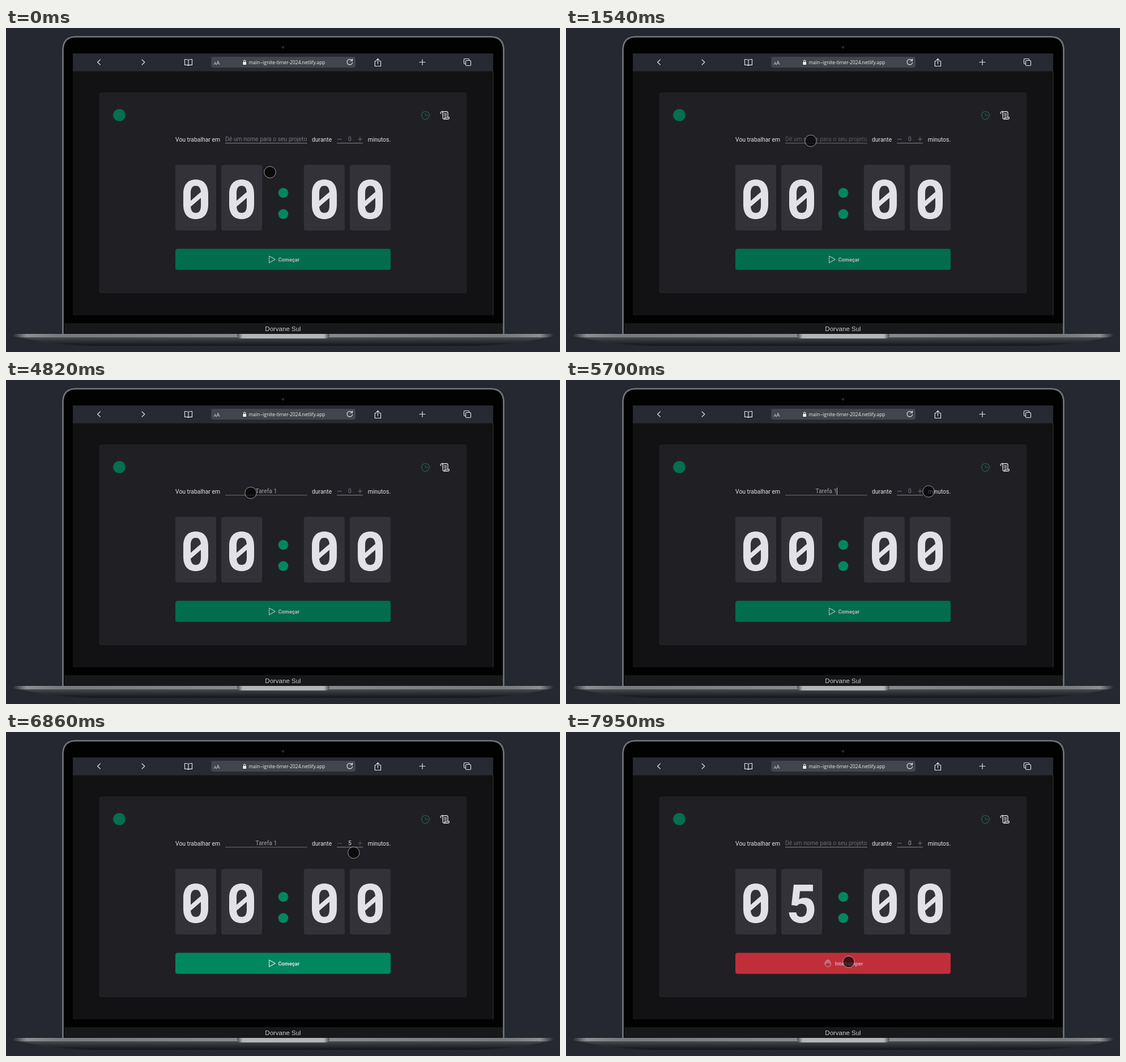
Write an HTML page that moves like this. It is 978 px wide and 573 px high and loops after 8 s.

```html
<!DOCTYPE html>
<html lang="pt">
<head>
<meta charset="utf-8">
<title>Timer</title>
<style>
html, body { margin: 0; width: 100%; height: 100%; overflow: hidden; background: #252830; }
svg { display: block; width: 100vw; height: 100vh; }
text { font-family: Roboto, sans-serif; font-size: 10.4px; fill: #e1e1e6; white-space: pre; }
.mid { text-anchor: middle; }
.bold { font-size: 9.3px; font-weight: 700; }
.line { fill: none; stroke: #e4e5e8; stroke-width: 1.15; stroke-linecap: round; stroke-linejoin: round; }
</style>
</head>
<body>
<svg viewBox="0 0 978 573" xmlns="http://www.w3.org/2000/svg">
  <defs>
    <linearGradient id="deck">
      <stop offset="0" stop-color="#25282f"/><stop offset=".025" stop-color="#8d8f92"/>
      <stop offset=".09" stop-color="#77797c"/><stop offset=".5" stop-color="#8a8c8f"/>
      <stop offset=".91" stop-color="#77797c"/><stop offset=".975" stop-color="#8d8f92"/>
      <stop offset="1" stop-color="#25282f"/>
    </linearGradient>
    <linearGradient id="hull" x2="0" y2="1">
      <stop offset="0" stop-color="#505257"/><stop offset=".4" stop-color="#35373c"/>
      <stop offset="1" stop-color="#15161a"/>
    </linearGradient>
    <linearGradient id="notch">
      <stop offset="0" stop-color="#4b4d50"/><stop offset=".06" stop-color="#b4b5b7"/>
      <stop offset=".94" stop-color="#b4b5b7"/><stop offset="1" stop-color="#4b4d50"/>
    </linearGradient>
    <path id="d0" fill-rule="evenodd" d="M-22-9C-22-26-14-35 0-35S22-26 22-9V9C22 26 14 35 0 35S-22 26-22 9Z
      M-9 2.5V-11C-9-20-6-24 0-24C5-24 8.3-21 9-13Z M9-2.5V11C9 20 6 24 0 24C-5 24-8.3 21-9 13Z"/>
    <path id="d5" d="M-18 3L-14-33H20V-21.5H-3L-4.5-7C-1.5-9 2-9.7 6-9.7C17-9.7 22.5-2 22.5 11
      C22.5 26 13 35-1 35C-13 35-22 27-22.5 16H-9.5C-9 21-6 24-1 24C6 24 9 19 9 11C9 4 5 .8-1 .8C-4 .8-6.5 2-8 4.5Z"/>
  </defs>
  <rect width="978" height="573" fill="#252830"/>

  <!-- laptop -->
  <path d="M100.5 543V39Q100.5 15.5 124 15.5H855Q878.5 15.5 878.5 39V543Z" fill="#020203" stroke="#74777b" stroke-width="2.6"/>
  <circle cx="489" cy="34" r="2.4" fill="#24262b"/>
  <rect x="103" y="522" width="774" height="20" fill="#17181a"/>
  <text class="mid" x="489" y="536.2" style="font:11.5px 'Liberation Sans',sans-serif;fill:#c9cacc">Dorvane Sul</text>
  <path d="M13 545C60 555 100 561 152 562H827C880 561 920 555 966 545Z" fill="url(#hull)"/>
  <path d="M12 541H967V544Q962 547 952 547H27Q17 547 12 544Z" fill="url(#deck)"/>
  <path d="M408 541H571V544Q570 549 563 549H416Q409 549 408 544Z" fill="url(#notch)"/>
  <path d="M329 556h4M646 556h4" stroke="#222429"/>

  <!-- browser -->
  <rect x="118" y="45" width="742" height="463" fill="#121214"/>
  <path d="M860 76V508" stroke="#36383d"/>
  <rect x="118" y="45" width="742" height="31.5" fill="#272a32"/>
  <rect x="362" y="51" width="255" height="19" rx="4" fill="#43454c"/>
  <text x="367" y="65" style="font:7px 'Open Sans',sans-serif">A<tspan font-size="9">A</tspan></text>
  <text x="428.5" y="64" style="font:8.35px 'Open Sans',sans-serif;fill:#f0f0f2">main--ignite-timer-2024.netlify.app</text>
  <rect x="418.3" y="60" width="5.8" height="5" rx=".8" fill="#eee"/>
  <path class="line" d="M419.5 60v-1.2a1.7 1.7 0 0 1 3.4 0V60"/>
  <g class="line">
    <path d="M166.3 56L161.6 60.5L166.3 65M240 56L244.7 60.5L240 65"/>
    <path d="M322 57Q321 55.5 318.5 55.5H315.5V65.3H319Q321.3 65.3 322 66.5Q322.7 65.3 325 65.3H328.5V55.5H325.5Q323 55.5 322 57V66.5"/>
    <path d="M611 57.5A4.8 4.8 0 1 0 611.7 61M611.5 54.5V58H608"/>
    <path d="M653.5 58.5H651.3V67.5H661.5V58.5H659.3M656.4 63.5V54.5M653.8 57L656.4 54.3L659 57"/>
    <path d="M735 55.5V65.5M730 60.5H740"/>
    <rect x="811.5" y="57.5" width="9" height="9" rx="1.5"/>
    <path d="M811 63.5H809.7Q808.5 63.5 808.5 62.3V55.7Q808.5 54.5 809.7 54.5H816.3Q817.5 54.5 817.5 55.7V57"/>
  </g>

  <!-- app -->
  <rect x="164.5" y="114" width="649" height="355" rx="4" fill="#202024"/>
  <circle cx="200" cy="154" r="10.8" fill="#04704f"/>
  <g class="line" style="stroke:#047150">
    <circle cx="740.5" cy="154.5" r="7"/><path d="M740.5 150.5V154.7H744.5"/>
  </g>
  <path class="line" style="stroke-width:1.3" d="M767.8 151.5A2 2 0 1 1 771.2 150V159A2 2 0 0 0 773 161H780.5A2 2 0 0 0 782 157.8H774.5A2 2 0 0 1 773 161M769 148H778Q780 148 780 150V157.5M773.8 152H777.5M773.8 154.8H777.5"/>

  <text x="299" y="200.6">Vou trabalhar em</text>
  <text id="hint" x="387" y="200.2">Dê um nome para o seu projeto</text>
  <text id="task" class="mid" x="459.5" y="200.2" style="fill:#a09fa4"></text>
  <rect id="caret" y="190.5" width="1" height="12.5" fill="#c4c4c9"/>
  <rect id="rule" x="387" y="203" width="144.7" height="1.2"/>
  <text x="540" y="200.6">durante</text>
  <path id="signs" d="M585 196.7H593M621 196.7H629M625 192.7V200.7" stroke-width="1"/>
  <text id="mins" class="mid" x="607" y="200.2">0</text>
  <rect x="584" y="203" width="46" height="1.2" fill="#77747f"/>
  <text x="638.7" y="200.6">minutos.</text>

  <g id="cards"></g>
  <circle cx="489.5" cy="291.5" r="8.8" fill="#00875f"/>
  <circle cx="489.5" cy="329" r="8.8" fill="#00875f"/>

  <rect id="button" x="299" y="390.5" width="380" height="37.3" rx="4"/>
  <g id="start">
    <path class="line" d="M464.6 403.3V415.3L475.2 409.3Z" style="stroke:inherit"/>
    <text class="bold" x="480.5" y="412.8" style="fill:inherit">Começar</text>
  </g>
  <g id="stop" style="fill:#c3a9aa;stroke:#c3a9aa">
    <path class="line" d="M459 410V405.2A1.1 1.1 0 0 1 461.2 405.2V408M461.2 408V403.8A1.1 1.1 0 0 1 463.4 403.8V408M463.4 408V405A1.1 1.1 0 0 1 465.6 405V409.5M465.6 408A1 1 0 0 1 467.3 408V411A4.9 4.9 0 0 1 458.2 413L456.5 408.7A1.1 1.1 0 0 1 458.4 407.8L459 409" style="stroke:inherit;stroke-width:1"/>
    <text class="bold" x="474.7" y="412.8" style="fill:inherit;stroke:none">Interromper</text>
  </g>
  <circle id="cursor" r="10.2" fill="#000" fill-opacity=".65" stroke="#fff" stroke-opacity=".55"/>
</svg>
<script>
const LOOP = 8000;
const ENABLED = 6390, CLICKED = 7810;
const $ = id => document.getElementById(id);

const path = [
  [0, 466, 255], [80, 466, 255], [420, 450, 229], [810, 432, 199.5],
  [5160, 432, 199.5], [5420, 520, 199], [5700, 640, 197], [5770, 645.5, 197],
  [5980, 626, 197], [6800, 626, 197], [6860, 614, 213], [7420, 511, 386],
  [7610, 499, 406.5], [LOOP, 499, 406.5]
];
const typed = [[2150, 1], [2350, 2], [2750, 3], [2890, 4], [3300, 5], [3430, 6], [3760, 7], [4290, 8]];
const caretOn = [[1010, 1540], [2020, 4820], [5350, ENABLED]];

const clamp = v => Math.max(0, Math.min(1, v));
const set = (id, attrs) => {
  for (const k in attrs) $(id).setAttribute(k, attrs[k]);
};
const show = (id, on) => $(id).setAttribute('visibility', on ? 'visible' : 'hidden');
const mix = (a, b, p) => `rgb(${a.map((v, i) => Math.round(v + (b[i] - v) * p))})`;

function along(t) {
  let i = 1;
  while (i < path.length - 1 && t > path[i][0]) i++;
  const [t0, x0, y0] = path[i - 1], [t1, x1, y1] = path[i];
  const p = clamp((t - t0) / (t1 - t0));
  return [x0 + (x1 - x0) * p, y0 + (y1 - y0) * p];
}

$('cards').innerHTML = [299, 380, 526, 607].map((x, i) =>
  `<rect x="${x}" y="242" width="72" height="116" rx="4" fill="#323238"/>
   <use id="digit${i}" href="#d0" x="${x + 36}" y="303" fill="#e1e1e6"/>`).join('');

function draw(t) {
  const running = t >= CLICKED;
  const ready = t >= ENABLED && !running;

  const [x, y] = along(t);
  set('cursor', { cx: x, cy: y });

  const count = typed.reduce((n, [at, len]) => t >= at ? len : n, 0);
  const text = running ? '' : 'Tarefa 1'.slice(0, count);
  $('task').textContent = text;
  show('hint', !text);
  $('hint').style.fill = running ? '#69696f' : t < 1010 ? '#74747f' : '#59595e';
  set('rule', { fill: t < 1010 || running ? '#777580' : '#665f68' });

  const width = text ? $('task').getComputedTextLength() : 0;
  set('caret', { x: 459 + width / 2 });
  show('caret', caretOn.some(([from, to]) => t >= from && t < to));

  $('mins').textContent = ready ? '5' : '0';
  $('mins').style.fill = ready ? '#e1e1e6' : running ? '#a5a5aa' : '#7c7c8a';
  set('signs', { stroke: ready ? '#55555c' : '#6c6c77' });

  const lit = clamp((t - ENABLED + 50) / 270);
  const hover = clamp((t - 7440) / 200);
  const green = hover ? mix([0, 135, 95], [1, 95, 67], hover) : mix([2, 109, 76], [0, 135, 95], lit);
  set('button', { fill: running ? '#c02e39' : green });
  const ink = mix([190, 180, 186], [225, 225, 230], lit);
  set('start', { fill: ink, stroke: 'none' });
  $('start').firstElementChild.style.stroke = ink;
  show('start', !running);
  show('stop', running);
  set('digit1', { href: running ? '#d5' : '#d0' });
}

function tick(now) {
  draw(now % LOOP);
  requestAnimationFrame(tick);
}
draw(0);
requestAnimationFrame(tick);
</script>
</body>
</html>
```
